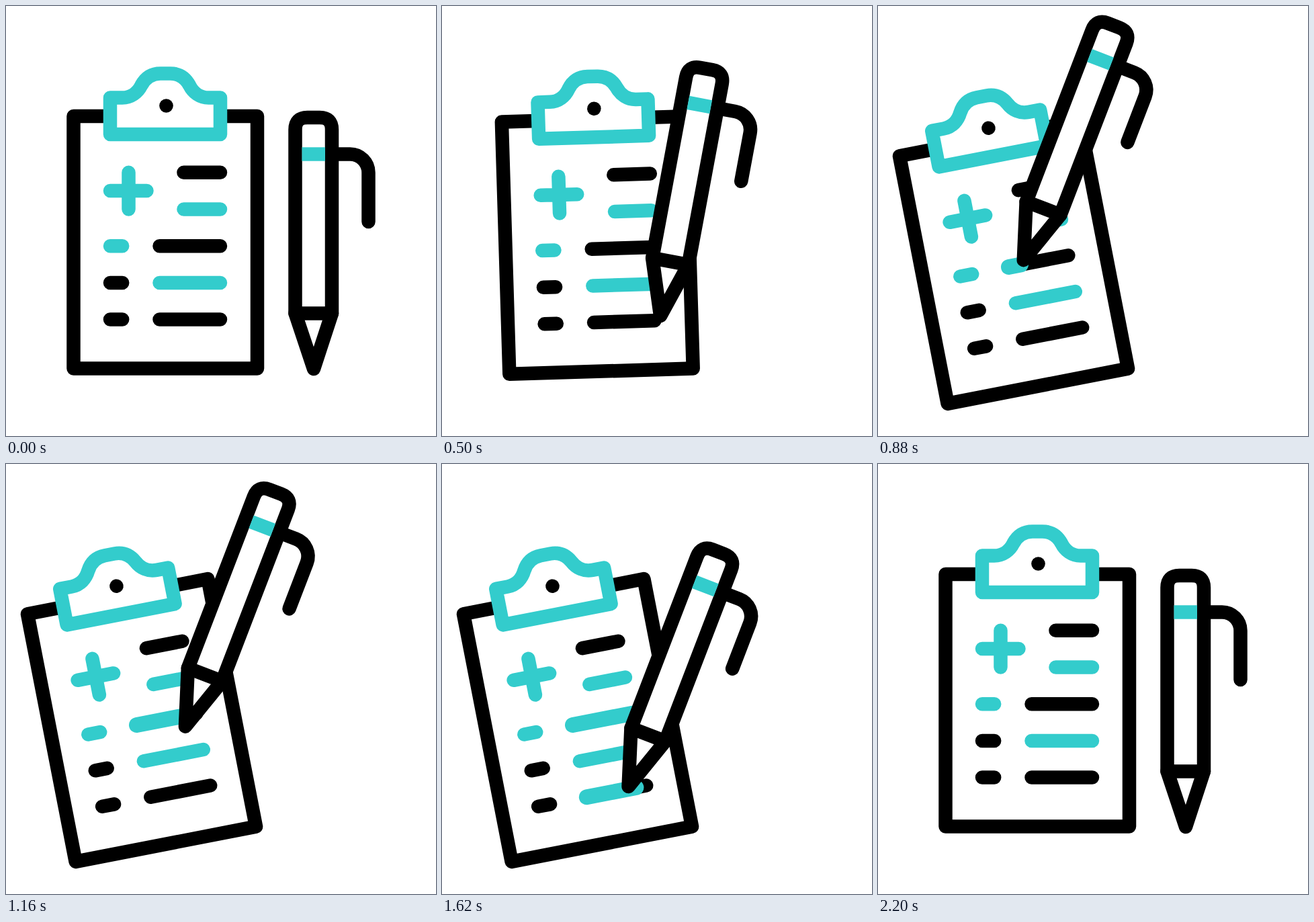
These frames come from a looping animation (640 by 640 pixels, 2400 ms). An HTML page:

```html
<!DOCTYPE html>
<html>
<head>
<meta charset="utf-8">
<style>
  html, body { margin: 0; height: 100%; overflow: hidden; background: #fff; }
  svg { display: block; width: 100vw; height: 100vh; }
  path { fill: none; stroke: #000; stroke-width: 20.5; stroke-linecap: round; stroke-linejoin: round; }
  .teal { stroke: #33cccc; }
  .ink { stroke: #33cccc; stroke-width: 23; }
  .solid { fill: #fff; }
</style>
</head>
<body>
<svg viewBox="0 0 640 640">
  <g id="board">
    <path class="solid" d="M100.5 164H374V539.5H100.5Z"/>
    <path class="solid teal" d="M155 136.5H173C186 136.5 196 129 201.5 118C208 106 218 100.5 230 100.5H244.500C256.500 100.500 266.500 106 273 118C278.500 129 288.500 136.500 301.500 136.500H319V191H155Z"/>
    <circle cx="238.500" cy="148.500" r="10.300"/>
    <path d="M264.500 247.700H319M228.500 357.200H319M155 412H173.200M155 466.500H173.200M228.500 466.500H319"/>
    <path class="teal" d="M155 275H209.500M182.500 247.700V302.500M264.500 302.500H319M155 357.200H173.200M228.500 412H319"/>
    <path class="ink" id="upper"/>
    <path class="ink" id="lower"/>
  </g>
  <!-- pen drawn with its tip at the origin -->
  <g id="pen">
    <g transform="translate(-458 -540)">
      <path d="M485 220.500H512A27.500 27.500 0 0 1 539.500 248V321"/>
      <path class="solid" d="M430.500 457.500V184Q430.500 166 448.500 166H467Q485 166 485 184V457.500L458 540Z"/>
      <path class="teal" style="stroke-linecap:butt" d="M440.500 220.500H475"/>
      <path d="M430.500 457.500H485"/>
    </g>
  </g>
</svg>
<script>
  const LOOP = 2400;
  const el = id => document.getElementById(id);
  const ramp = (t, a, b) => Math.min(1, Math.max(0, (t - a) / (b - a)));
  const ease = p => p * p * (3 - 2 * p);

  // time, tip x, tip y, angle
  const penKeys = [
    [200, 458, 540, 0],
    [800, 193, 383, 21],
    [1100, 281, 365, 21],
    [1400, 212, 491, 21],
    [1700, 301, 476, 21],
    [2200, 458, 540, 0]
  ];

  function penPose(t) {
    let i = 0;
    while (i < penKeys.length - 2 && t > penKeys[i + 1][0]) i++;
    const a = penKeys[i], b = penKeys[i + 1], p = ramp(t, a[0], b[0]);
    return a.map((v, k) => v + (b[k] - v) * p);
  }

  function drawInk(id, y, from, to) {
    const x = p => 228.5 + 90.5 * p;
    el(id).setAttribute("d", from < to ? `M${x(from)} ${y}H${x(to)}` : "");
  }

  function draw(now) {
    const t = now % LOOP;
    const tilt = 11 * (ease(ramp(t, 400, 800)) - ease(ramp(t, 1800, 2200)));
    el("board").setAttribute("transform", `rotate(${-tilt} 374 549.5)`);
    drawInk("upper", 357.2, ramp(t, 1700, 1950), ramp(t, 800, 1200));
    drawInk("lower", 466.5, ramp(t, 1800, 2180), ease(ramp(t, 1400, 1700)));
    const [, x, y, angle] = penPose(t);
    el("pen").setAttribute("transform", `translate(${x} ${y}) rotate(${angle})`);
  }

  const start = performance.now();
  function tick() {
    draw(performance.now() - start);
    requestAnimationFrame(tick);
  }
  tick();
</script>
</body>
</html>
```
